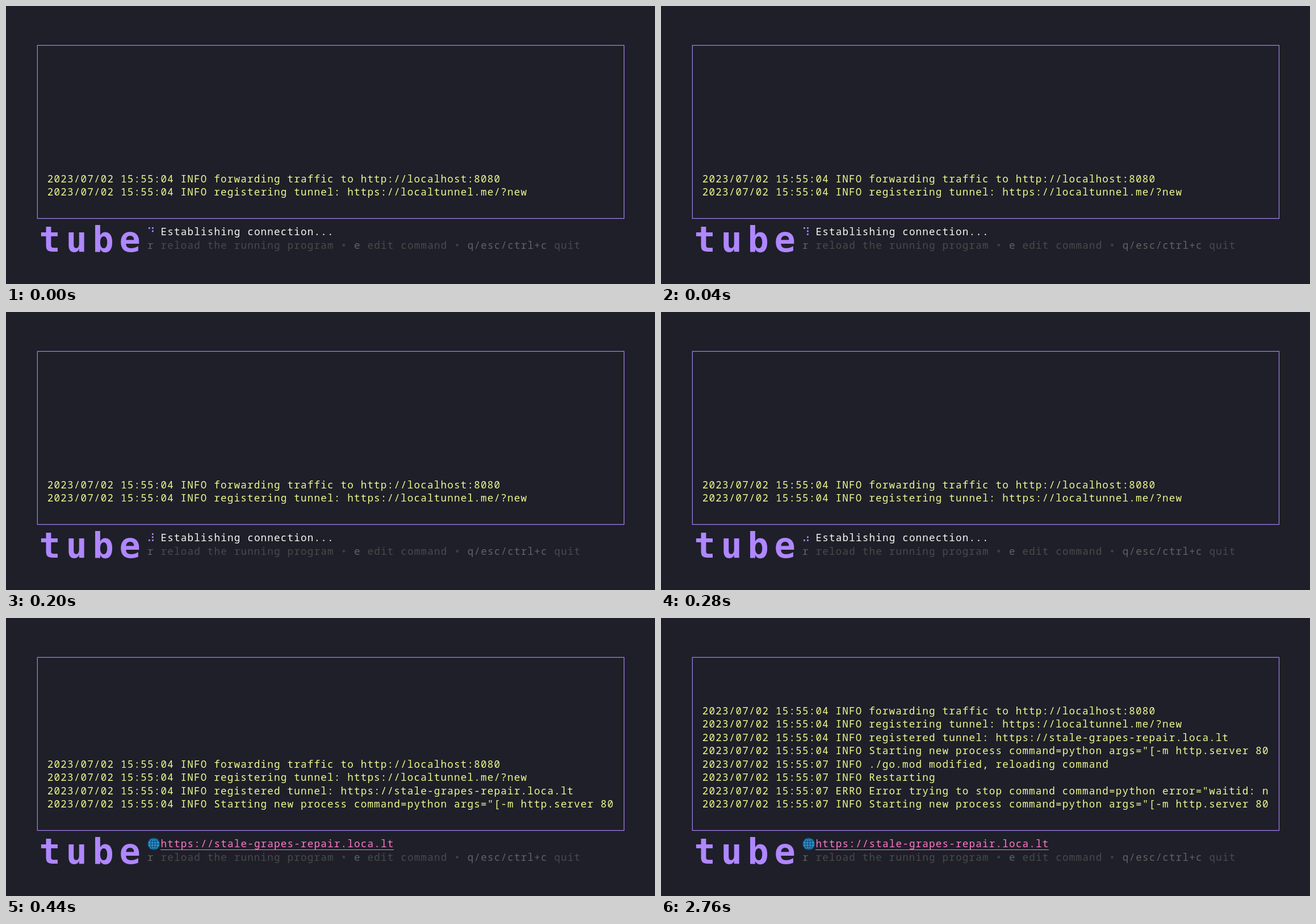
These frames come from a looping animation (1143 px wide and 490 px high, 9.72 s). An HTML page:

```html
<!DOCTYPE html>
<html lang="en">
<head>
<meta charset="utf-8">
<title>tube</title>
<style>
  html, body { margin: 0; width: 100%; height: 100%; overflow: hidden; background: #1e1f29; }
  svg { display: block; width: 100%; height: 100%; }
  text {
    font: 17.6px "Noto Sans Mono", "DejaVu Sans Mono", monospace;
    letter-spacing: 1.185px;
    white-space: pre;
  }
  #log text { fill: #f1fa8c; }
  .title { font: bold 62px "DejaVu Sans Mono", monospace; letter-spacing: 9.7px; fill: #af87ff; }
  .status { fill: #f8f8f2; }
  .link { fill: #ff79c6; }
  .key { fill: #626262; }
  .desc { fill: #4a4a4a; }
  .sep { fill: #3c3c3c; font-family: "DejaVu Sans Mono", monospace; }
</style>
</head>
<body>
<svg viewBox="0 0 1143 490">
  <rect x="55.3" y="69.4" width="1033.2" height="305.1" fill="none" stroke="#a582f0" stroke-width="1.2"/>
  <g id="log"></g>
  <text class="title" x="58.5" y="433">tube</text>

  <g id="wait">
    <g id="dots" fill="#af87ff"></g>
    <text class="status" x="272.5" y="404.4">Establishing connection...</text>
  </g>

  <g id="ready">
    <g fill="none" stroke="#12466c" stroke-width="1.1">
      <circle cx="260.2" cy="398.2" r="10.4" fill="#2b93cf"/>
      <ellipse cx="260.2" cy="398.2" rx="5" ry="10.4"/>
      <path d="M260.2 387.8v20.8M249.8 398.2h20.8M251.6 392.4q8.6 3 17.2 0M251.6 404q8.6-3 17.2 0"/>
    </g>
    <text class="link" x="272.5" y="404.4">https://stale-grapes-repair.loca.lt</text>
    <rect class="link" x="272" y="408" width="411" height="1"/>
  </g>

  <text x="249" y="427.9"><tspan class="key">r</tspan><tspan class="desc"> reload the running program</tspan><tspan class="sep"> • </tspan><tspan class="key">e</tspan><tspan class="desc"> edit command</tspan><tspan class="sep"> • </tspan><tspan class="key">q/esc/ctrl+c</tspan><tspan class="desc"> quit</tspan></text>
</svg>
<script>
const LOOP = 9720, ROW = 23.5, LAST_Y = 334.2;
const NS = 'http://www.w3.org/2000/svg';
const $ = id => document.getElementById(id);

const lines = [
  ['04 INFO', 'forwarding traffic to http://localhost:8080'],
  ['04 INFO', 'registering tunnel: https://localtunnel.me/?new'],
  ['04 INFO', 'registered tunnel: https://stale-grapes-repair.loca.lt'],
  ['04 INFO', 'Starting new process command=python args="[-m http.server 80'],
  ['07 INFO', './go.mod modified, reloading command'],
  ['07 INFO', 'Restarting'],
  ['07 ERRO', 'Error trying to stop command command=python error="waitid: n'],
  ['07 INFO', 'Starting new process command=python args="[-m http.server 80'],
];

// start time, visible log lines, spinner glyph (empty once connected)
const steps = [
  [0, 2, '⠙'], [40, 2, '⠹'], [120, 2, '⠸'], [200, 2, '⠼'],
  [280, 2, '⠴'], [360, 3, '⠦'], [440, 4, ''], [2760, 8, ''],
];

function add(parent, tag, attrs) {
  const el = document.createElementNS(NS, tag);
  for (const k in attrs) el.setAttribute(k, attrs[k]);
  return parent.appendChild(el);
}

const rows = lines.map(([head, msg]) => {
  const el = add($('log'), 'text', { x: 72.8 });
  el.textContent = `2023/07/02 15:55:${head} ${msg}`;
  return el;
});

// braille bits 0-5 run down the left column, then the right
const dots = Array.from({ length: 6 }, (_, i) => add($('dots'), 'rect', {
  x: 251 + 6 * Math.floor(i / 3), y: 390 + 5.5 * (i % 3), width: 2.8, height: 2.8,
}));

const show = (el, on) => el.setAttribute('visibility', on ? 'inherit' : 'hidden');
let current;

function draw(t) {
  const step = steps.findLast(s => s[0] <= t);
  if (step === current) return;
  current = step;
  const [, count, glyph] = step;
  rows.forEach((el, i) => {
    show(el, i < count);
    el.setAttribute('y', LAST_Y - ROW * (count - 1 - i));
  });
  show($('wait'), glyph);
  show($('ready'), !glyph);
  const bits = glyph ? glyph.charCodeAt(0) - 0x2800 : 0;
  dots.forEach((el, i) => show(el, bits >> i & 1));
}

const start = performance.now();
function tick() {
  draw((performance.now() - start) % LOOP);
  requestAnimationFrame(tick);
}
tick();
</script>
</body>
</html>
```
